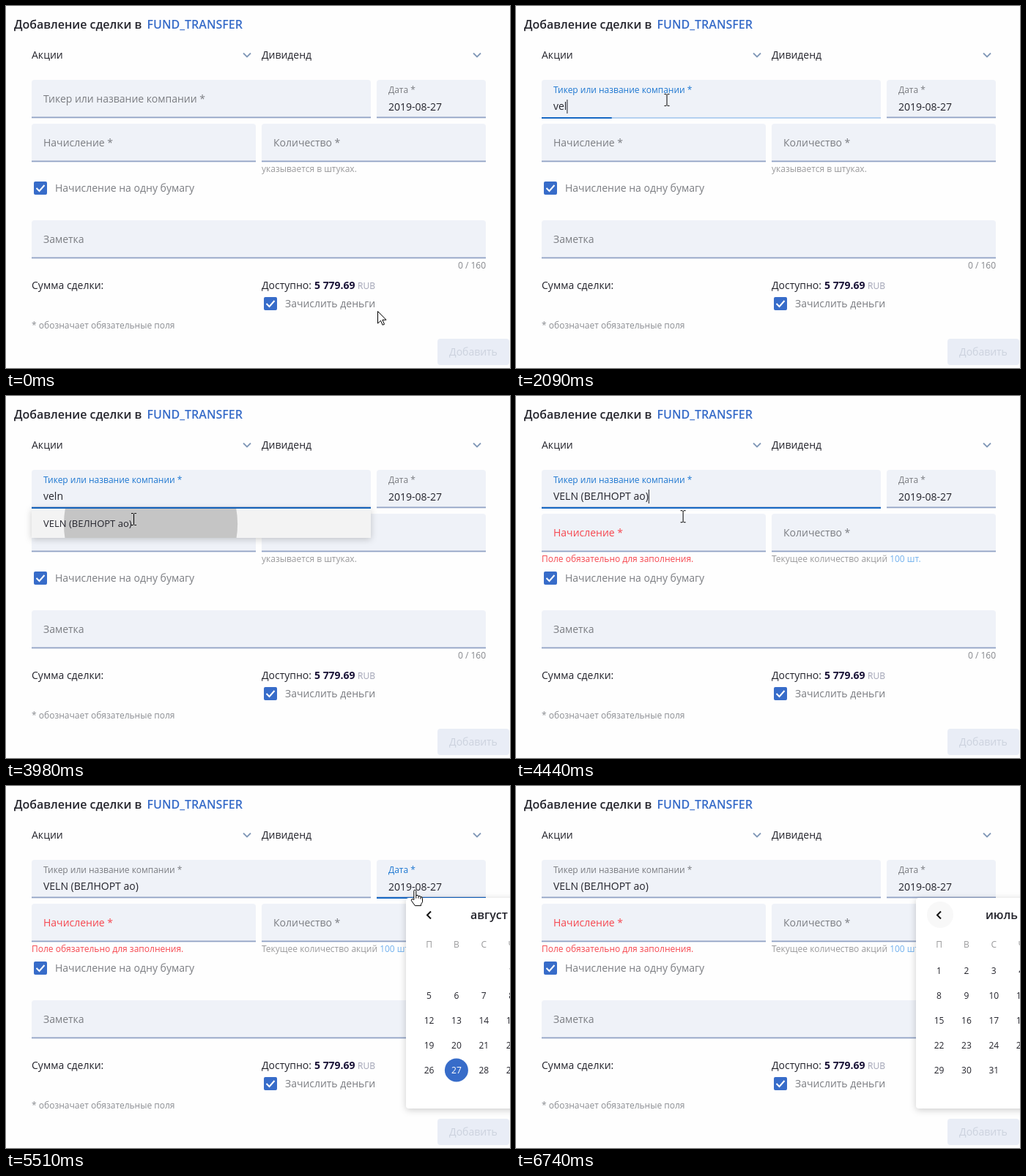
Animation, 688 px wide and 495 px high, one loop 8 s. Source, as an HTML page:

```html
<!DOCTYPE html>
<html lang="ru">
<head>
<meta charset="utf-8">
<style>
html, body { margin: 0; width: 688px; height: 495px; overflow: hidden; background: #fefefe; }
svg { display: block; font: 14px "Open Sans", "Noto Sans", sans-serif; fill: #24242c; }
.grey { fill: #7b7d82; }
.small { font-size: 12px; }
.hint { font-size: 12px; fill: #9a9a9c; }
.bold { font-weight: 600; }
.field { fill: #eff2f8; }
.line { fill: #92a3c5; }
.focus { fill: #1668c4; }
.chevron { fill: none; stroke: #8299b8; stroke-width: 1.8; }
.box { fill: #376cc9; }
.tick { fill: none; stroke: #fff; stroke-width: 2; }
.mid { text-anchor: middle; }
.panel { fill: #fff; filter: drop-shadow(0 2px 5px #0003); }
#pointer path { fill: #fff; stroke: #000; stroke-linejoin: round; }
</style>
</head>
<body>
<svg width="688" height="495" viewBox="0 0 688 495">
  <defs>
    <clipPath id="menuClip"><rect x="35" y="154" width="463" height="40"/></clipPath>
    <clipPath id="calClip"><rect x="546" y="153" width="142" height="288"/></clipPath>
  </defs>

  <g class="bold" font-size="16">
    <text x="11" y="31">Добавление сделки в</text>
    <text x="192.5" y="31" fill="#376cc9">FUND_TRANSFER</text>
  </g>
  <text x="35" y="72">Акции</text>
  <text x="349" y="72">Дивиденд</text>
  <path class="chevron" d="M324 64.5l5 5 5-5M638 64.5l5 5 5-5"/>

  <g id="fields"></g>
  <text id="tickerLabel">Тикер или название компании *</text>
  <text id="dateLabel" class="small" x="522" y="119">Дата *</text>
  <text id="ticker" x="51" y="142"></text>
  <text x="522" y="143">2019-08-27</text>
  <rect id="caret" y="128" width="1" height="19"/>
  <g id="loader">
    <rect x="35" y="151" width="463" height="3" fill="#eff2f8"/>
    <rect x="35" y="152" width="463" height="2" fill="#b4d0f0"/>
    <rect id="bar" class="focus" y="152" height="2"/>
  </g>
  <rect id="tickerFocus" class="focus" y="152" height="2"/>
  <rect id="dateFocus" class="focus" y="152" height="2"/>

  <text id="amountLabel" x="51" y="192">Начисление *</text>
  <text class="grey" x="365" y="192">Количество *</text>
  <text class="grey" x="51" y="324">Заметка</text>
  <text id="error" class="small" x="35" y="227" fill="#f6474f">Поле обязательно для заполнения.</text>
  <text id="unitHint" class="hint" x="349" y="227">указывается в штуках.</text>
  <text id="stockHint" class="hint" x="349" y="227">Текущее количество акций <tspan fill="#73b2ee">100 шт.</tspan></text>

  <g id="checks"></g>
  <text class="grey" x="67" y="254">Начисление на одну бумагу</text>
  <text class="grey" x="381" y="412">Зачислить деньги</text>
  <text class="hint" x="655" y="359" text-anchor="end" style="fill:#85878c">0 / 160</text>
  <text x="35" y="387">Сумма сделки:</text>
  <text x="349" y="387">Доступно:</text>
  <text x="421" y="387" font-weight="700" fill="#1b1438">5 779.69</text>
  <text class="hint" x="480" y="387" style="fill:#a0a2b4">RUB</text>
  <text class="hint" x="35" y="441" style="fill:#8b8d92">* обозначает обязательные поля</text>
  <rect x="589" y="455" width="98" height="36" rx="4" fill="#e9edf6"/>
  <text class="mid" x="638" y="478" fill="#ccd2de">Добавить</text>

  <g id="menu">
    <rect class="panel" x="35" y="154" width="463" height="40"/>
    <rect id="hover" x="35" y="154" width="463" height="40" fill="#f3f3f3"/>
    <g clip-path="url(#menuClip)"><circle id="ripple" cy="175" fill="#000"/></g>
    <text x="51" y="179" font-size="13">VELN (ВЕЛНОРТ ао)</text>
  </g>

  <g id="calendar">
    <rect class="panel" x="546" y="153" width="290" height="288" rx="4"/>
    <circle id="prevHover" cx="579" cy="176" r="18"/>
    <circle id="prevRipple" cx="577.5" cy="176" fill="#000"/>
    <g clip-path="url(#calClip)"><g id="august"></g><g id="july"></g></g>
    <path d="M580 171.5l-5 5 5 5" fill="none" stroke="#111" stroke-width="2"/>
  </g>

  <g id="pointer">
    <path id="arrow" d="M.5.5V17l4-3.8 2.6 6 2.4-1-2.6-6H12z"/>
    <path id="beam" style="fill:none" d="M-3.5-7.5h2.5l1 1 1-1h2.5M0-6.5V7.500M-3.5 8.500h2.500l1-1 1 1h2.500"/>
    <path id="hand" d="M-1.500 14V2a1.500 1.500 0 0 1 3 0V8q3-1 3.200 1q3-.8 3 1q2.500-.5 2.500 2v5l-2 3v2H0l-5-7q0-2.500 2-2zM1.500 8v4M4.700 9v3M7.700 10v3"/>
  </g>
</svg>
<script>
const LOOP = 8000;
const $ = id => document.getElementById(id);
const clamp = v => Math.max(0, Math.min(1, v));
const mix = (a, b, p) => a + (b - a) * p;
const step = (t, start, length) => {
  const p = clamp((t - start) / length);
  return p * p * (3 - 2 * p);
};
const between = (t, a, b) => t >= a && t < b;
const set = (id, attrs) => {
  for (const name in attrs) $(id).setAttribute(name, attrs[name]);
};
const show = (id, on) => set(id, { opacity: +on });
const tint = (id, from, to, p) => {
  $(id).style.fill = `color-mix(in srgb, ${to} ${p * 100}%, ${from})`;
};

// Linear interpolation through [position, value] pairs
function along(points, p) {
  let i = 1;
  while (i < points.length - 1 && p > points[i][0]) i++;
  const [a, b] = [points[i - 1], points[i]];
  return mix(a[1], b[1], clamp((p - a[0]) / (b[0] - a[0])));
}

const fieldBox = (x, y, w) =>
  `<path class="field" d="M${x} ${y + 52}v-48q0-4 4-4h${w - 8}q4 0 4 4v48z"/>
   <rect class="line" x="${x}" y="${y + 50.5}" width="${w}" height="1.8"/>`;
$('fields').innerHTML = [[35, 101, 463], [506, 101, 149], [35, 161, 306], [349, 161, 306], [35, 293, 620]]
  .map(f => fieldBox(...f)).join('');

$('checks').innerHTML = [[38, 240], [352, 398]].map(([x, y]) =>
  `<rect class="box" x="${x}" y="${y}" width="18" height="18" rx="2"/>
   <path class="tick" d="M${x + 3.5} ${y + 9}l4 4 7-8"/>`).join('');

function month(title, titleX, first, days, chosen) {
  const colX = c => 577.5 + 37.4 * c;
  let out = `<text class="bold" font-size="16" x="${titleX}" y="182">${title}</text>`;
  [...'ПВСЧПСВ'].forEach((d, c) => out += `<text class="hint mid" x="${colX(c)}" y="221">${d}</text>`);
  for (let d = 1; d <= days; d++) {
    const cell = first + d - 1, x = colX(cell % 7), y = 256.5 + 34 * Math.floor(cell / 7);
    if (d === chosen) out += `<circle cx="${x}" cy="${y - 4}" r="16" fill="#376cc9"/>`;
    out += `<text class="small mid" x="${x}" y="${y}" fill="${d === chosen ? '#fff' : '#24242c'}">${d}</text>`;
  }
  return out;
}
$('august').innerHTML = month('август 2019', 634, 3, 31, 27);
$('july').innerHTML = month('июль 2019', 641, 0, 31);

const GREY = '#7b7d82', BLUE = '#1f78d1', RED = '#f6474f';
const FOCUS = 580, PICK = 4120, DATE = 5113, TICKER_BLUR = 5183, PREV = 5924;
const KEYS = [1690, 1880, 2080, 2280];

const pathPoints = [
  [100, 507, 417], [540, 205, 127], [1640, 205, 127], [1800, 206, 128],
  [3440, 206, 128], [3850, 174.5, 168], [4260, 174.5, 168], [5030, 558, 141],
  [5480, 558, 141], [5850, 574, 174], [6440, 574, 174], [6740, 650, 333]
];

function drawPointer(t) {
  let i = 1;
  while (i < pathPoints.length - 1 && t > pathPoints[i][0]) i++;
  const [t0, x0, y0] = pathPoints[i - 1], [t1, x1, y1] = pathPoints[i];
  const p = step(t, t0, t1 - t0), x = mix(x0, x1, p), y = mix(y0, y1, p);
  const kind = t < 4260 ? (y < 213 ? 'beam' : 'arrow') : x > 506 ? 'hand' : 'beam';
  set('pointer', { transform: `translate(${x} ${y})`, opacity: +(t < 6740) });
  for (const k of ['arrow', 'beam', 'hand']) show(k, k === kind);
}

function underline(id, x, w, p) {
  set(id, { x: x + w * (1 - p) / 2, width: w * p });
}

function drawTicker(t) {
  const focus = step(t, FOCUS, 180) * (1 - step(t, TICKER_BLUR, 180));
  const up = step(t, FOCUS, 180);
  set('tickerLabel', { transform: `translate(51 ${mix(132, 119, up)}) scale(${mix(1, 12 / 14, up)})` });
  tint('tickerLabel', GREY, BLUE, focus);

  const typed = KEYS.filter(k => t >= k).length;
  $('ticker').textContent = t >= PICK ? 'VELN (ВЕЛНОРТ ао)' : 'veln'.slice(0, typed);

  const lastEdit = t >= PICK ? PICK : typed ? KEYS[typed - 1] : FOCUS;
  const lit = Math.floor((t - lastEdit) / 500) % 2 === 0 && !between(t, 1580, 1640);
  set('caret', { x: 51 + (typed ? $('ticker').getComputedTextLength() : 0) });
  show('caret', lit && between(t, FOCUS, DATE));

  const loading = between(t, 1700, 3270);
  show('loader', loading);
  underline('tickerFocus', 35, 463, loading ? 0 : focus);
  const p = (t - (t < 2735 ? 1700 : 2735)) / 2000;
  const left = -.549 + along([[0, 0], [.25, .3765], [.4835, .8439], [1, 1.6028]], p);
  const right = left + along([[0, .08], [.1915, .457], [.4415, .727], [1, .08]], p);
  set('bar', { x: 35 + 463 * clamp(left), width: 463 * (clamp(right) - clamp(left)) });
}

function drawMenu(t) {
  set('menu', { opacity: step(t, 3180, 110) * (1 - step(t, PICK, 90)) });
  show('hover', t > 3700);
  const p = step(t, 3908, 225);
  set('ripple', { cx: mix(175, 266, p), r: mix(78, 242, p), opacity: t > 3908 ? .19 : 0 });
}

function drawNotes(t) {
  const p = step(t, PICK, 180);
  tint('amountLabel', GREY, RED, p);
  set('error', { opacity: p });
  show('unitHint', t < PICK);
  show('stockHint', t >= PICK);
}

function drawDate(t) {
  const focus = step(t, DATE, 180) * (1 - step(t, PREV, 180));
  underline('dateFocus', 506, 149, focus);
  tint('dateLabel', GREY, BLUE, focus);

  set('calendar', { opacity: step(t, 5290, 150) });
  show('august', t < 5950);
  show('july', t >= 5950);
  set('july', { transform: `translate(${-263 * (1 - step(t, 5950, 380))} 0)` });

  const leave = step(t, 6480, 150);
  $('prevHover').style.fill = leave > .5 ? '#f8f8f8' : '#e2e2e2';
  show('prevHover', t > 5800);
  set('prevRipple', { r: mix(8, 17, step(t, PREV, 150)), opacity: t > PREV ? .24 * (1 - step(t, 6080, 240)) : 0 });
}

function frame(now) {
  const t = now % LOOP;
  drawTicker(t);
  drawMenu(t);
  drawNotes(t);
  drawDate(t);
  drawPointer(t);
  requestAnimationFrame(frame);
}
requestAnimationFrame(frame);
</script>
</body>
</html>
```
